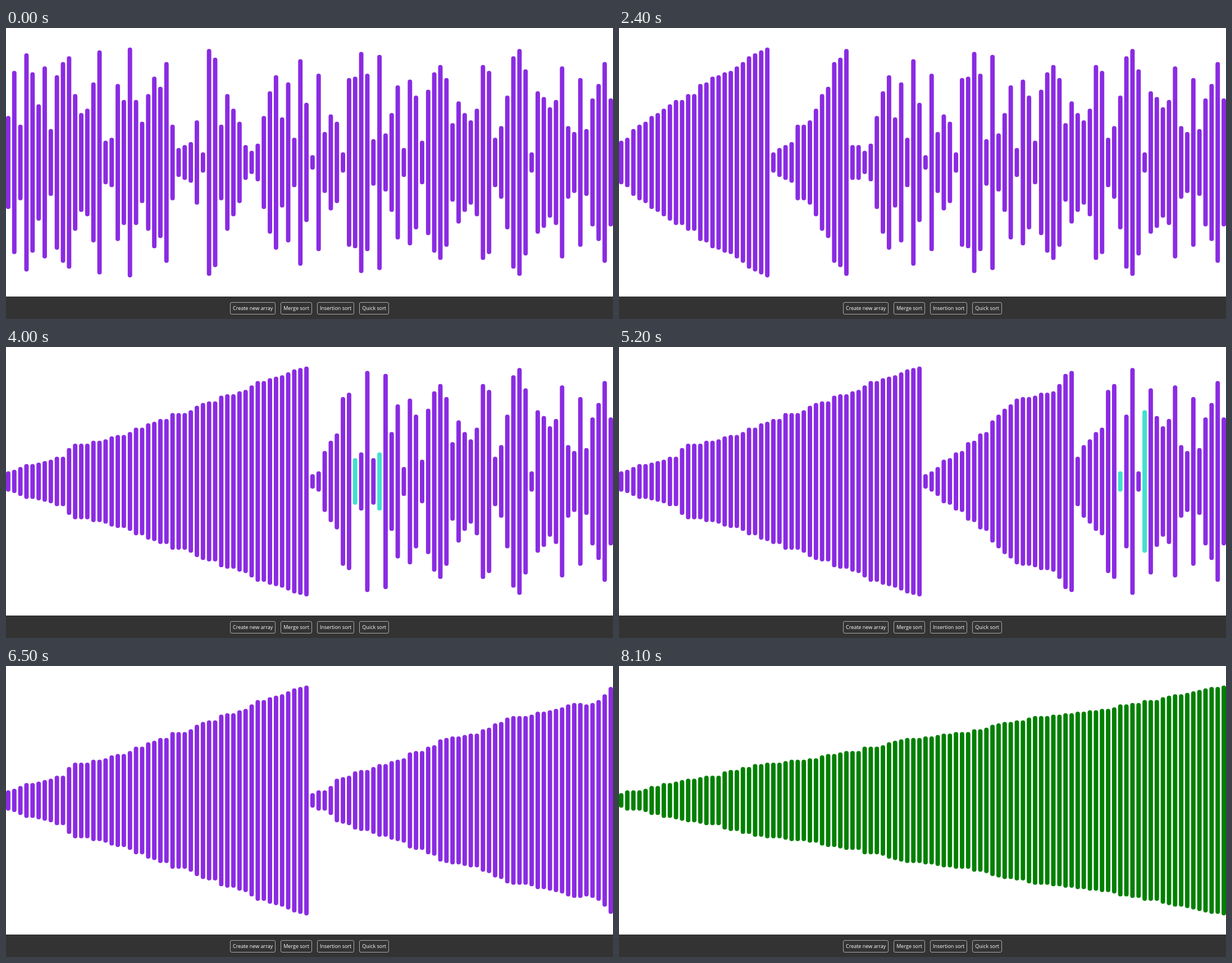
Recreate the animation shown at these times as an HTML page with a canvas. Size 1081x518 px, loop 8.3 s.

```html
<!DOCTYPE html>
<html lang="en">
<head>
<meta charset="utf-8">
<title>Merge sort</title>
<style>
  html, body { margin: 0; width: 1081px; height: 518px; overflow: hidden; background: #fff; }
  canvas { display: block; }
  footer {
    position: absolute; top: 478px; left: 0; width: 1081px; height: 40px;
    box-sizing: border-box; padding-top: 10px;
    display: flex; justify-content: center; align-items: flex-start; gap: 9px;
    background: #333;
  }
  button {
    box-sizing: border-box; height: 22px; margin: 0; padding: 0 4px;
    border: 1px solid #aaa; border-radius: 3px; background: none;
    color: #fff; font: 9px/20px "Open Sans", "Noto Sans", sans-serif; white-space: nowrap;
  }
  button.pressed { background: #555; }
</style>
</head>
<body>
<canvas width="1081" height="518"></canvas>
<footer>
  <button>Create new array</button>
  <button id="merge">Merge sort</button>
  <button>Insertion sort</button>
  <button>Quick sort</button>
</footer>
<script>
const LOOP = 8300, TICK = 100;
const BAR = 7.9, PITCH = (1081 - BAR) / 99, MIDDLE = 239.3, UNIT = 5.18;
const values = [
  32, 63, 26, 75, 62, 40, 66, 23, 60, 69, 73, 47, 34, 37, 55, 77, 15, 17, 54, 43,
  79, 43, 28, 47, 59, 52, 69, 26, 10, 12, 14, 29, 7, 78, 72, 26, 47, 37, 28, 12,
  8, 13, 32, 49, 60, 31, 55, 17, 71, 41, 5, 61, 21, 33, 28, 7, 58, 59, 76, 61,
  16, 74, 20, 34, 53, 10, 57, 46, 15, 50, 62, 67, 58, 27, 42, 34, 29, 37, 67, 63,
  17, 25, 46, 73, 78, 64, 7, 49, 45, 38, 43, 66, 25, 21, 58, 23, 44, 54, 69, 44
];
// [time in ms, actions done]: a write takes two actions, a green bar one
const pace = [
  [750, 0], [1200, 91], [2400, 336], [2600, 336], [2700, 375],
  [4000, 635], [5200, 871], [6500, 1134], [8000, 1435], [8100, 1444]
];
const ctx = document.querySelector("canvas").getContext("2d");
const mergeButton = document.getElementById("merge");
const writes = [];

function mergeSort(a, lo, hi) {
  if (lo >= hi) return;
  const mid = (lo + hi) >> 1;
  mergeSort(a, lo, mid);
  mergeSort(a, mid + 1, hi);
  const old = a.slice();
  for (let k = lo, i = lo, j = mid + 1; k <= hi; k++) {
    const active = [];
    if (i <= mid) active.push(i);
    if (j <= hi) active.push(j);
    const takeLeft = j > hi || (i <= mid && old[i] <= old[j]);
    a[k] = takeLeft ? old[i++] : old[j++];
    writes.push({ k, value: a[k], active });
  }
}
mergeSort(values.slice(), 0, values.length - 1);

function actionsAt(t) {
  if (t <= pace[0][0]) return 0;
  const n = pace.findIndex(p => p[0] >= t);
  if (n < 0) return pace.at(-1)[1];
  const [t0, a0] = pace[n - 1], [t1, a1] = pace[n];
  return Math.round(a0 + (a1 - a0) * (t - t0) / (t1 - t0));
}

function draw(t) {
  const actions = actionsAt(t);
  const done = Math.min(Math.ceil(actions / 2), writes.length);
  const green = actions - 2 * writes.length;
  const bars = values.slice();
  for (const w of writes.slice(0, done)) bars[w.k] = w.value;
  const active = green < 0 && actions % 2 ? writes[done - 1].active : [];

  ctx.clearRect(0, 0, 1081, 518);
  bars.forEach((v, i) => {
    ctx.fillStyle = i < green ? "green" : active.includes(i) ? "turquoise" : "blueviolet";
    ctx.beginPath();
    ctx.roundRect(i * PITCH, MIDDLE - v * UNIT / 2, BAR, v * UNIT, BAR / 2);
    ctx.fill();
  });
  mergeButton.classList.toggle("pressed", t === 700);
}

function frame() {
  const t = performance.now() % LOOP;
  draw(Math.floor(t / TICK) * TICK);
  requestAnimationFrame(frame);
}
frame();
</script>
</body>
</html>
```
